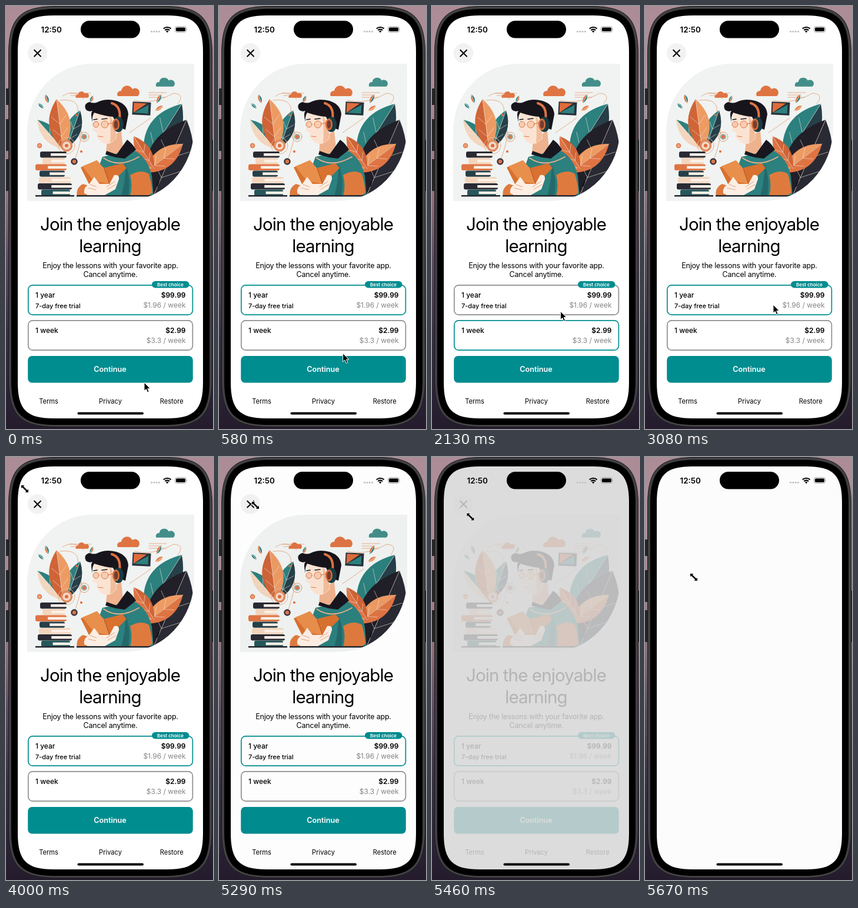
An HTML page that plays this animation: 352x718 px, repeating every 5.72 s.

```html
<!DOCTYPE html>
<html lang="en">
<head>
<meta charset="utf-8">
<title>Subscription screen</title>
<style>
  html, body { margin: 0; width: 100%; height: 100%; overflow: hidden; background: #2b2538; }
  svg { display: block; width: 352px; height: 718px; }
  text { font-family: Inter, "Open Sans", sans-serif; font-size: 12px; font-optical-sizing: none; }
  .title { font-size: 29.5px; letter-spacing: -.9px; }
  .sub { font-size: 12.5px; letter-spacing: -.2px; }
  .medium { font-weight: 500; }
  .bold { font-weight: 600; }
  .mid { text-anchor: middle; }
  .end { text-anchor: end; }
  .link { font-size: 11.1px; }
  .line { fill: none; stroke-linecap: round; stroke-linejoin: round; }
</style>
</head>
<body>
<svg viewBox="0 0 352 718">
  <defs>
    <linearGradient id="sky" x1="0" y1="0" x2="0" y2="1">
      <stop offset="0" stop-color="#ab8c96"/>
      <stop offset=".16" stop-color="#b08f97"/>
      <stop offset=".42" stop-color="#967680"/>
      <stop offset=".6" stop-color="#5b4a5e"/>
      <stop offset=".78" stop-color="#352d45"/>
      <stop offset="1" stop-color="#241c2c"/>
    </linearGradient>
    <clipPath id="screen"><path id="glass"/></clipPath>
    <clipPath id="petal"><path d="M36 212A110 114 0 0 1 146 98H320V206A118 125 0 0 1 202 331H36Z"/></clipPath>
  </defs>

  <!-- Wallpaper and phone body -->
  <rect width="352" height="718" fill="url(#sky)"/>
  <g fill="#262427">
    <rect x="-3" y="140" width="9" height="28" rx="2"/>
    <rect x="-3" y="192" width="9" height="54" rx="2"/>
    <rect x="-3" y="260" width="9" height="54" rx="2"/>
    <rect x="348" y="227" width="6" height="87" rx="2"/>
  </g>
  <path id="frame" fill="#3b3a3d" stroke="#1d1c1f"/>
  <path id="shine" fill="none" stroke="#4e4d50"/>
  <path id="bezel"/>

  <g clip-path="url(#screen)">
    <rect id="backdrop" x="20" y="16" width="315" height="684"/>
    <g id="page">
      <rect x="20" y="16" width="315" height="684" fill="#fff"/>
      <circle cx="53.5" cy="80" r="16.7" fill="#f2f2f2"/>
      <path d="M48.2 74.7l10.8 10.8m0-10.8L48.2 85.5" class="line" stroke="#000" stroke-width="2"/>

      <g clip-path="url(#petal)">
        <rect x="36" y="98" width="284" height="233" fill="#f0f3f1"/>
        <path class="line" stroke="#e39a74" stroke-width=".8" d="M96 153Q115 140 132 158M92 160Q126 156 122 182T134 222M108 200Q126 195 128 210T116 264M218 160Q250 168 285 148Q305 150 292 166M243 147h30M243 151h22M243 155h28M108 148h36M110 152h30M210 215Q225 205 246 190M106 214Q118 224 126 205"/>
        <g id="plants"></g>

        <g transform="rotate(3 230 174)">
          <rect x="215" y="163" width="31" height="22" fill="#27313a"/>
          <path d="M217 165h22l-22 17Z" fill="#df6c3b"/><path d="M242 167v15h-24Z" fill="#2c807e"/>
        </g>
        <g class="line">
          <circle cx="103" cy="237" r="14" stroke="#e7b397"/>
          <circle cx="103" cy="237" r="8.5" fill="#f4d8c5" stroke="#e08a60" stroke-width="3.5"/>
          <circle cx="103" cy="237" r="3" fill="#dd6c3d"/>
          <circle cx="133" cy="222" r="8" stroke="#e39a74"/>
          <circle cx="133" cy="222" r="4" fill="#dd7446" stroke="#8fb5b2" stroke-width="2"/>
          <circle cx="116" cy="264" r="4.5" fill="#dd7446" stroke="#3a3540" stroke-width="2.5"/>
          <circle cx="57" cy="237" r="3.5" fill="#f0a27a" stroke="#dd7446" stroke-width="1.5"/>
          <circle cx="128" cy="247" r="2" fill="#df6c3b"/><circle cx="120" cy="185" r="2" fill="#df6c3b"/>
        </g>
        <g id="books"></g>

        <!-- Reader -->
        <path d="M172 226l24-14 3 30-14 14-15-6Z" fill="#efb28e"/>
        <path d="M147 179L180 184l7 24 1 17-10 8q-10 3-17-3l-7-8 1-7-8-4 6-14Z" fill="#fbe3d3"/>
        <path d="M176 184l11 24v17l-10 8q2-22-1-49Z" fill="#f2bd9b"/>
        <path d="M136 176Q131 166 142 163Q150 166 156 163Q170 156 188 161Q207 167 208 184L203 210L190 205L182 188Q168 187 150 181Q146 187 147 197Q143 182 147 178Q140 180 136 176Z" fill="#17151b"/>
        <g class="line" stroke="#df7443">
          <circle cx="153" cy="201" r="5" fill="#f7cdb2"/><circle cx="168" cy="201" r="6" fill="#f7cdb2"/>
          <path d="M174 200l10-2M157 221l8 1"/>
          <path d="M149 193l6-1m8 0l9-1" stroke="#17151b" stroke-width="1.6"/>
          <path d="M180 165Q196 170 193 192" stroke-width="4"/>
        </g>
        <ellipse cx="191" cy="201" rx="9" ry="13" fill="#173c43"/>
        <ellipse cx="187" cy="201" rx="6" ry="10" fill="#d96d3a"/><ellipse cx="187" cy="201" rx="3.5" ry="7" fill="#743d30"/>
        <path d="M164 256L190 250L216 244Q241 256 248 288L251 323H149Q150 290 164 256Z" fill="#2c807e"/>
        <path d="M166 258Q192 276 226 256" class="line" stroke="#e9b08a" stroke-width="2"/>
        <path d="M211 287q18-11 32-2 5 16 6 32l-9 6h-29q5-18 0-36Z" fill="#df7a3e"/>
        <path d="M203 268q10 24 5 55h-12q8-30 7-55Z" fill="#23696b"/>
        <path d="M121 323q-3-14 10-21l12 4-6 17Z" fill="#df7a3e"/>
        <path d="M171 246l17 6 18-25q9 6 15 17l-19 15-15-2-18-5Z" fill="#18171f"/>
        <path d="M127 274l27-12 12 13 32-8 7 8-29 29-35-2Z" fill="#d9712f"/>
        <path d="M130 272l25-10 12 14 9 26-27-5Z" fill="#e98f4c"/>
        <path d="M167 276l9 26" class="line" stroke="#a94f2b"/>
        <path d="M133 318q-2-10 8-15l9-13 9 12 17 0 8-15q9-2 8 7l-6 17-18 10H140Z" fill="#fdeee4"/>
        <path d="M143 303l11 4m-14 2l13 3m18-5l14-9m-12 13l14-8" class="line" stroke="#dda281"/>
        <path d="M120 321h131v2.500H120Z" fill="#23272f"/>
        <path d="M255 305l3-9 3 2-3 9Z" fill="#18171f"/>
      </g>

      <text class="title mid" x="177" y="381">Join the enjoyable</text>
      <text class="title mid" x="177" y="418">learning</text>
      <text class="sub mid" x="177.500" y="445">Enjoy the lessons with your favorite app.</text>
      <text class="sub mid" x="177.500" y="460">Cancel anytime.</text>

      <g fill="none" stroke-width="1.700">
        <rect id="year" x="37.800" y="473.800" width="279.600" height="50.400" rx="7.500"/>
        <rect id="week" x="37.800" y="533.800" width="279.600" height="50.400" rx="7.500"/>
      </g>
      <rect x="248" y="467" width="63.500" height="11.500" rx="5.700" fill="#008d90"/>
      <text class="bold mid" x="279.500" y="475.700" fill="#fff" style="font-size:8px">Best choice</text>
      <text class="medium" x="50" y="495">1 year</text>
      <text class="medium" x="50" y="512.500" style="font-size:10.900px">7-day free trial</text>
      <text class="bold end" x="305.500" y="495">$99.99</text>
      <text class="end" x="305.500" y="512" fill="#858585">$1.96 / week</text>
      <text class="medium" x="50" y="555">1 week</text>
      <text class="bold end" x="305.500" y="555">$2.99</text>
      <text class="end" x="305.500" y="572" fill="#858585">$3.3 / week</text>

      <rect x="37.200" y="594" width="280.600" height="45.600" rx="7" fill="#008d90"/>
      <text class="bold mid" x="177" y="621" fill="#fff" style="font-size:12.700px">Continue</text>
      <text class="link mid" x="72.500" y="674.500">Terms</text>
      <text class="link mid" x="177.500" y="674.500">Privacy</text>
      <text class="link mid" x="281.700" y="674.500">Restore</text>
    </g>

    <!-- Status bar and home indicator -->
    <text class="bold" x="59.500" y="44.700" style="font-size:13.400px">12:50</text>
    <rect x="127" y="25" width="101" height="29.500" rx="14.700"/>
    <g fill="#c4c4c4">
      <circle cx="247.500" cy="43.300" r="1.600"/><circle cx="251.800" cy="43.300" r="1.600"/>
      <circle cx="256.100" cy="43.300" r="1.600"/><circle cx="260.400" cy="43.300" r="1.600"/>
    </g>
    <path d="M267.800 38.600a9 9 0 0 1 12.800 0M270.300 41.200a5.500 5.500 0 0 1 7.800 0" fill="none" stroke="#000" stroke-width="2.100"/>
    <path d="M274.200 45.300l-2.200-2.400a3.200 3.200 0 0 1 4.400 0Z"/>
    <rect x="287.500" y="35" width="19" height="9.500" rx="3" fill="none" stroke="#999"/>
    <rect x="289" y="36.500" width="16" height="6.500" rx="1.700"/>
    <path d="M307.600 38.300q1.600 1.500 0 3Z" fill="#999"/>
    <rect x="121.500" y="689.500" width="112.500" height="4" rx="2"/>
  </g>

  <path id="arrow" d="M0 0V14.300L3.300 11.300L5.700 16.800L8.100 15.700L5.800 10.400H10.200Z" stroke="#fff"/>
  <path id="resize" d="M-6.500-6.500H.2L-1.900-4.300L4.400 1.900L6.500-.2V6.500H-.2L1.900 4.300L-4.400-1.900L-6.500 .2Z" stroke="#fff"/>
</svg>

<script>
const $ = id => document.getElementById(id);
const LOOP = 5720, ACCENT = '#008d90', MUTED = '#8e8e8e';
const TEAL = '#2c807e', DEEP = '#263f48', DARK = '#292a33', ORANGE = '#df7443', PEACH = '#ed9b63', CREAM = '#f3d5bd';

// Rectangle with continuous corners, which blend into the sides more gently than arcs.
function squircle(id, x, y, w, h, r) {
  const e = r * 1.36, k = e * .24, X = x + w, Y = y + h;
  $(id).setAttribute('d', `M${x} ${y + e}C${x} ${y + k} ${x + k} ${y} ${x + e} ${y}H${X - e}` +
    `C${X - k} ${y} ${X} ${y + k} ${X} ${y + e}V${Y - e}C${X} ${Y - k} ${X - k} ${Y} ${X - e} ${Y}` +
    `H${x + e}C${x + k} ${Y} ${x} ${Y - k} ${x} ${Y - e}Z`);
}
squircle('frame', 4.5, .5, 346, 714, 60);
squircle('shine', 6.5, 2.5, 342, 710, 58);
squircle('bezel', 9, 5, 337, 706, 55.5);
squircle('glass', 20, 16, 315, 684, 45);

// Two-tone leaf from its base to its tip, with pale veins.
function leaf(x, y, tipX, tipY, width, left, right) {
  const dx = tipX - x, dy = tipY - y, len = Math.hypot(dx, dy);
  const nx = -dy / len * width, ny = dx / len * width;
  const half = (side, fill) =>
    `<path d="M${x} ${y}Q${x + dx * .5 + nx * side} ${y + dy * .5 + ny * side} ${tipX} ${tipY}Z" fill="${fill}"/>`;
  let veins = `M${x} ${y}L${tipX} ${tipY}`;
  if (len > 25) for (const k of [.25, .5]) for (const side of [-.35, .35])
    veins += `M${x + dx * k} ${y + dy * k}l${dx * .16 + nx * side} ${dy * .16 + ny * side}`;
  return half(1, right) + half(-1, left) + `<path d="${veins}" class="line" stroke="#f3e4d8" stroke-width=".6"/>`;
}

const cloud = (x, y, size, fill) =>
  `<path transform="translate(${x} ${y})scale(${size})" fill="${fill}" d="M-17 8a6 6 0 0 1 6-9A10 10 0 0 1 8-4A7 7 0 0 1 17 8Z"/>`;

$('plants').innerHTML =
  cloud(207, 145, 1, ORANGE) + cloud(270, 130, .85, '#438e8a') + cloud(129, 151, .6, ORANGE) +
  leaf(97, 243, 53, 193, 24, CREAM, TEAL) +
  leaf(103, 241, 126, 177, 26, TEAL, DEEP) +
  leaf(97, 243, 86, 158, 36, '#cf6437', PEACH) +
  leaf(72, 165, 67, 150, 6, ORANGE, TEAL) + leaf(64, 174, 55, 165, 5, TEAL, '#5aa19b') +
  leaf(256, 165, 264, 150, 6, ORANGE, TEAL) + leaf(254, 178, 267, 169, 6, ORANGE, PEACH) +
  leaf(143, 164, 148, 152, 5, TEAL, ORANGE) +
  leaf(236, 265, 299, 166, 54, TEAL, DEEP) +
  leaf(250, 324, 307, 193, 74, '#211f27', DARK) +
  leaf(236, 283, 301, 234, 32, PEACH, ORANGE) +
  leaf(252, 276, 217, 221, 24, ORANGE, '#cf6437');

const spines = [
  [58, 45, DARK], [62, 38, CREAM], [50, 53, ORANGE], [57, 43, DEEP],
  [56, 54, CREAM], [54, 58, DARK], [60, 49, '#25575b']
];
$('books').innerHTML = spines.map(([x, width, fill], i) => {
  const y = 247 + i * 10.8;
  return `<rect x="${x}" y="${y}" width="${width}" height="10.4" rx="3" fill="${fill}"/>` +
    `<rect x="${x + width * .4}" y="${y + 3}" width="${width * .6}" height="4.5" fill="#fbf0e7"/>`;
}).join('') + '<path d="M50 321h66v2.500H50Z" fill="#23272f"/>';

// Pointer stops: time, x, y
const stops = [
  [0, 235, 639], [40, 235, 639], [790, 205, 578], [1040, 205, 578], [1290, 198, 562], [1630, 198, 560],
  [2290, 222, 511], [2920, 222, 511], [3080, 218, 507], [3460, 218, 507], [3980, 32, 54], [4040, 32, 54],
  [4600, 53, 80], [5210, 62, 82], [5390, 62, 82], [5670, 83, 204], [5720, 84, 207]
];
const clamp = v => Math.min(1, Math.max(0, v));
const smooth = v => v * v * (3 - 2 * v);

function pointerAt(t) {
  const i = Math.max(1, stops.findIndex(s => s[0] >= t));
  const [t0, x0, y0] = stops[i - 1], [t1, x1, y1] = stops[i];
  const k = smooth((t - t0) / (t1 - t0));
  return [x0 + (x1 - x0) * k, y0 + (y1 - y0) * k];
}

function draw(now) {
  const t = now % LOOP;
  const [x, y] = pointerAt(t);
  const resizing = t >= 3900;
  $('arrow').style.display = resizing ? 'none' : '';
  $('resize').style.display = resizing ? '' : 'none';
  $(resizing ? 'resize' : 'arrow').setAttribute('transform', `translate(${x} ${y})`);

  // A tap picks the weekly plan, a second one goes back to the yearly plan.
  const weekly = t >= 1480 && t < 2480;
  $('year').setAttribute('stroke', weekly ? MUTED : ACCENT);
  $('week').setAttribute('stroke', weekly ? ACCENT : MUTED);

  // The page cross-fades to an empty one over black.
  const fade = 1 - (1 - clamp((t - 5290) / 280)) ** 2, level = Math.round(252 * fade);
  $('page').setAttribute('opacity', 1 - fade);
  $('backdrop').setAttribute('fill', `rgb(${level},${level},${level})`);
}

const start = performance.now();
function tick() {
  draw(performance.now() - start);
  requestAnimationFrame(tick);
}
tick();
</script>
</body>
</html>
```
